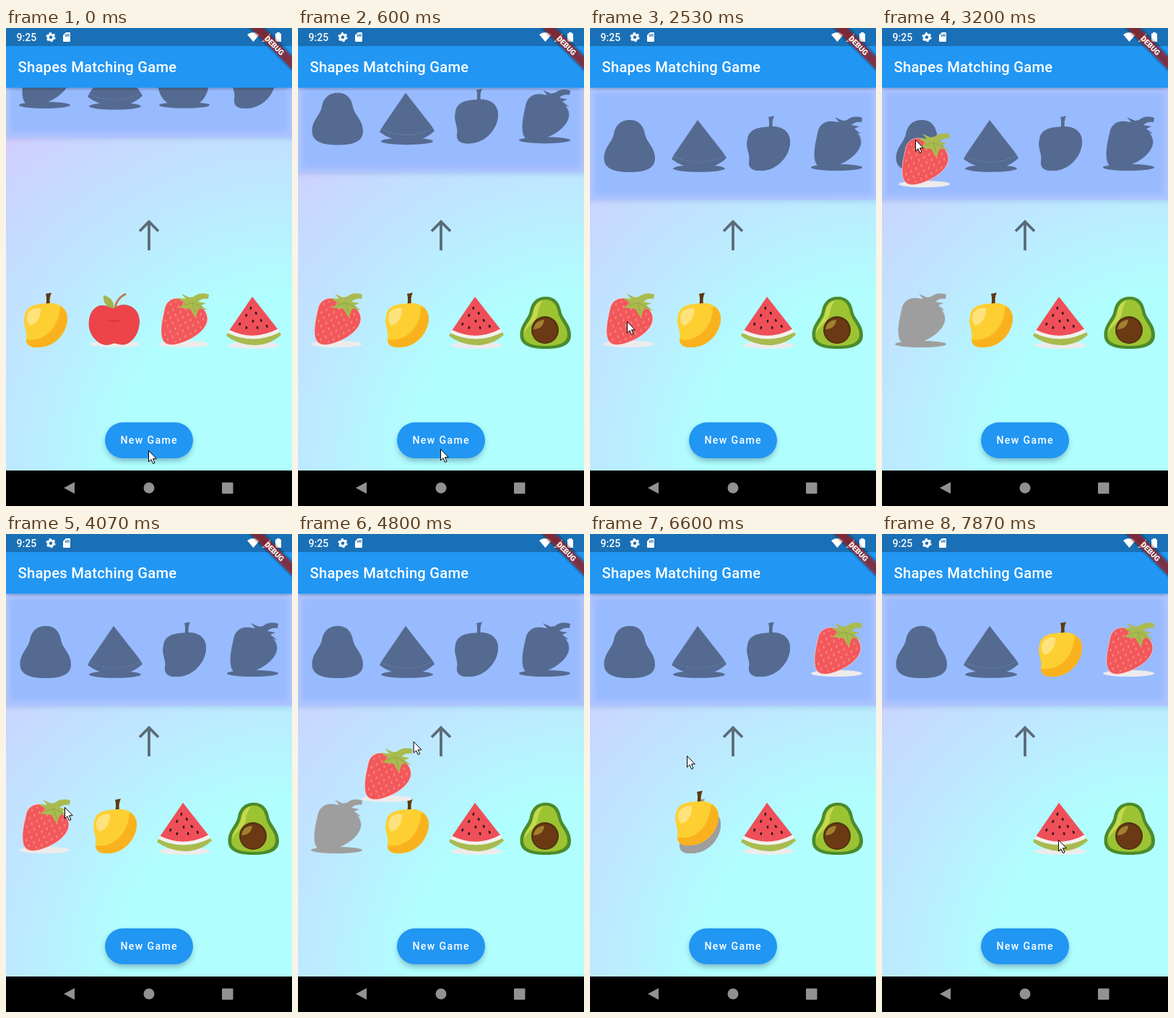
Animation, 396 px wide and 660 px high, one loop 8000 ms. Source, as an HTML page:

```html
<!DOCTYPE html>
<html lang="en">
<head>
<meta charset="utf-8">
<title>Shapes Matching Game</title>
<style>
  html, body { margin: 0; width: 100%; height: 100%; overflow: hidden; }
  svg { display: block; }
  text { font-family: Roboto, sans-serif; font-weight: 500; fill: #fff; }
  .dark { filter: url(#dark); }
  .grey { filter: url(#grey); }
</style>
</head>
<body>
<svg width="396" height="660" viewBox="0 0 396 660">
  <defs>
    <radialGradient id="sky" gradientUnits="userSpaceOnUse" cx="396" cy="610" r="660">
      <stop offset=".36" stop-color="#b0fffe"/>
      <stop offset=".5" stop-color="#b8f1ff"/>
      <stop offset=".63" stop-color="#bfe5ff"/>
      <stop offset=".78" stop-color="#c7d9ff"/>
      <stop offset="1" stop-color="#d8c6ff"/>
    </radialGradient>
    <filter id="dark"><feFlood flood-color="#546a90"/><feComposite in2="SourceAlpha" operator="in"/></filter>
    <filter id="grey"><feFlood flood-color="#9e9e9e"/><feComposite in2="SourceAlpha" operator="in"/></filter>
    <filter id="soft" x="-20%" y="-20%" width="140%" height="140%"><feGaussianBlur stdDeviation="4"/></filter>
    <clipPath id="body"><path d="M0 82H396V610H0Z"/></clipPath>
    <pattern id="seeds" width="11" height="12" patternUnits="userSpaceOnUse" patternTransform="rotate(18)">
      <path d="M2 2l.7 2.200M7.500 8l.7 2.200" stroke="#f9a99a" stroke-width="1.2" stroke-linecap="round"/>
    </pattern>
    <pattern id="dots" width="5" height="5" patternUnits="userSpaceOnUse" patternTransform="rotate(20)">
      <path fill="#ee4348" d="M0 0H5V5H0Z"/>
      <circle cx="1.5" cy="1.5" r=".45" fill="#d93a40"/><circle cx="4" cy="4" r=".45" fill="#f2666a"/>
    </pattern>

    <g id="mango">
      <path fill="#5f3813" d="M55.500 22C56.500 15 56 10 55 7L63 5.500C60.500 10 60 16 61 22Z"/>
      <path fill="#fdcf31" d="M26 37C28 25 39 20.500 56 20.500C72 18 85 26 85 41C85 60 68 82 42 81C32 81 27 76 28 68C30 60 25 52 25 44Z"/>
      <path fill="#f9b21d" d="M75 24C82 28 85 34 85 41C85 60 68 82 42 81C33 81 28 77 28 70C54 74 73 54 75 24Z"/>
      <path fill="#fee27c" d="M30 35C33 28 41 25 48 27C49 38 43 48 34 51C28 47 28 40 30 35Z"/>
    </g>
    <g id="apple">
      <ellipse cx="55" cy="76.500" rx="35" ry="4.300" fill="#eeebec"/>
      <path fill="url(#dots)" stroke="#d5363e" stroke-width=".7" d="M55 27C62 19 87 20 88.500 44C89 62 77 77 66 77C60 77 58 75 53 75C48 77 44 78 40 77C29 75 19 62 19 49C19 28 32 21 42 24C48 24 52 25 55 27Z"/>
      <path fill="none" stroke="#c9343b" d="M45 43Q55 47 63 42M51 45l8-1"/>
      <path fill="none" stroke="#bd7b4f" stroke-width="3" d="M55 27Q57 13 70 7"/>
      <path fill="#a5b448" d="M53 27C42 26 38 18 39 9C49 11 54 18 53 27Z"/>
    </g>
    <g id="strawberry">
      <ellipse cx="53.5" cy="76.500" rx="35.5" ry="4.500" fill="#eeebec"/>
      <path fill="#f2585b" stroke="#ffe3e0" stroke-width=".6" d="M23 62C22 50 26 36 28 26C31 15 42 11 52 14L66 18C78 22 88 32 87 43C85 58 66 70 50 75C38 79 24 80 23 62Z"/>
      <path fill="url(#seeds)" d="M26 62C25 50 29 36 31 27C34 17 44 14 52 17L66 22C77 25 85 33 84 43C82 55 66 67 50 72C38 76 27 76 26 62Z"/>
      <path fill="#a9bb4f" d="M51 7L62 12L68 11C72 7 80 5 89 8L88 14C81 13 77 15 74 18L85 20L78 23L87 30L75 27L70 40L63 28L47 26L56 20L45 13L57 14Z"/>
      <path fill="none" stroke="#8fa743" d="M54 23L66 19L70 33M66 19L80 26"/>
    </g>
    <g id="melon">
      <ellipse cx="55" cy="78" rx="36" ry="4.800" fill="#eeebec"/>
      <path fill="#a9bb4f" d="M19 61Q55 78 91 60L93 63.500Q78 78 55 78Q32 77 17 65Z"/>
      <path fill="#f3f1ee" d="M21.500 57L88 55.500L91 60Q55 78 19 61Z"/>
      <path fill="#ef4f58" d="M53 11L88 55.500Q55 73 21.500 57Z"/>
      <path stroke="#33191d" stroke-width="2.600" stroke-linecap="round" d="M51 26l-.3 1.500M45 36l-.5 1.500M58 33l.5 1.500M54 44l0 1.500M65 43l.5 1.500M36 48l-.5 1.500M45 53l-.3 1.500M60 53l.3 1.500M73 51l.5 1.500"/>
    </g>
    <g id="avocado">
      <path fill="#4b8b2c" d="M55 11C68 11 74 19 76 30C78 42 90 48 90 64C90 78 77 83 55 83C33 83 19.500 78 19.500 64C19.500 48 31 42 33 30C35 19 42 11 55 11Z"/>
      <path fill="#9cc332" d="M55 15C65 15 70 22 72 32C74 44 85 50 85 63C85 75 73 79 55 79C36 79 24 75 24 63C24 50 35 44 37 32C39 22 45 15 55 15Z"/>
      <path fill="#c6d94f" d="M51 16C43 18 39 24 38 32C36 45 25 50 25 62C28 52 42 46 44 34C45 26 48 21 51 16Z"/>
      <circle cx="54" cy="57" r="19" fill="#51300f"/>
      <circle cx="54" cy="57.500" r="17" fill="#6b3a15"/>
      <path fill="#a1802f" d="M38 56C39 48 45 43 53 43C52 51 47 56 38 56Z"/>
    </g>
  </defs>

  <path fill="url(#sky)" d="M0 82H396V611H0Z"/>
  <path fill="none" stroke="#5b6b78" stroke-width="3.800" d="M198 307V268M185 280.500L198 267.500L211 280.500"/>
  <g clip-path="url(#body)">
    <g id="panel">
      <rect x="-8" y="87" width="412" height="151" fill="#5f83c8" opacity=".35" filter="url(#soft)"/>
      <rect y="82" width="396" height="155" fill="#b0c5ff"/>
      <rect x="5" y="88" width="386" height="143" fill="#98baff" filter="url(#soft)"/>
      <g id="targets"></g>
    </g>
  </g>

  <rect x="139" y="550" width="118" height="47" rx="23" fill="#234a70" opacity=".45" filter="url(#soft)"/>
  <rect x="137" y="544.500" width="122" height="49.500" rx="24.700" fill="#2196f3"/>
  <text x="158.500" y="574" font-size="14.100" letter-spacing="1.35">New Game</text>

  <path d="M0 74H396V84H0Z" opacity=".25" filter="url(#soft)" clip-path="url(#body)"/>
  <path fill="#2196f3" d="M0 25H396V82.500H0Z"/>
  <path fill="#1a70b6" d="M0 0H396V25H0Z"/>
  <text x="16.500" y="61" font-size="20.200" letter-spacing=".24">Shapes Matching Game</text>
  <text x="14.500" y="18" font-size="14">9:25</text>
  <g fill="#fff">
    <circle cx="62" cy="12.700" r="3.700" fill="none" stroke="#fff" stroke-width="3"/>
    <circle cx="62" cy="12.700" r="5.600" fill="none" stroke="#fff" stroke-width="2" stroke-dasharray="3 2.864"/>
    <path d="M83 6H88Q89 6 89 7V18Q89 19 88 19H80Q79 19 79 18V10Z"/>
    <path fill="none" stroke="#1a70b6" stroke-width="1.200" d="M82.500 9v3M84.700 8v4M87 8v4"/>
    <path d="M334 9Q342.500 3 351 9L342.500 19Z"/>
    <path d="M354 19L366 7V19Z"/>
    <path d="M373 7.500H375V6H379V7.500H381V19H373Z"/>
  </g>
  <g transform="translate(396 0) rotate(45)">
    <path d="M-60 28H60V40H-60Z" opacity=".5" filter="url(#soft)"/>
    <path fill="#b71c1c" opacity=".63" d="M-60 28H60V40.500H-60Z"/>
    <text y="38" font-size="10.300" text-anchor="middle" style="font-weight:900">DEBUG</text>
  </g>

  <path d="M0 611H396V660H0Z"/>
  <g fill="#919191">
    <path d="M80 635L95 627V643Z"/>
    <circle cx="198" cy="635" r="7.500"/>
    <rect x="299" y="627.500" width="15.500" height="15.500" rx="1"/>
  </g>

  <g id="pieces"></g>
  <path id="cursor" fill="#fff" stroke="#000" d="M.5 .5V16L4 12.700L6.500 18.500L9 17.500L6.500 11.800H11.300Z"/>
</svg>

<script>
const TICKS = 120, TICKS_PER_MS = 0.015;   // 15 pictures a second, 8 s
const LAG = 1.5;                           // dragged pieces trail the pointer
const SLOT = 96, TOP = 116, BOTTOM = 360;
const el = id => document.getElementById(id);

// Rows before and after the reshuffle
const rounds = [
  { top: ['strawberry', 'melon', 'apple', 'mango'], bottom: ['mango', 'apple', 'strawberry', 'melon'] },
  { top: ['avocado', 'melon', 'mango', 'strawberry'], bottom: ['strawberry', 'mango', 'melon', 'avocado'] }
];
const RESHUFFLE = 6, PANEL_END = 16;

const drags = [
  { name: 'strawberry', from: 39, to: 55, grab: [51, 405] },
  { name: 'strawberry', from: 67, to: 86, grab: [47, 399], match: true },
  { name: 'mango', from: 97, to: 114, grab: [141, 400], match: true }
];

// Pointer path: tick, x, y
const path = [
  [0, 197, 583], [5, 197, 583], [8, 197, 581], [25, 197, 581],
  [37.5, 51, 405], [39, 51, 405], [46.5, 56, 184], [48, 46, 154], [50, 47, 145],
  [54, 47, 145], [58, 92, 290], [61, 81, 377], [65, 47, 399], [66, 47, 399],
  [77.5, 313, 161], [79, 338, 152], [81, 350, 145], [85, 350, 145],
  [95, 141, 400], [96, 141, 400], [97.5, 138, 389], [99, 134, 306], [102, 123, 230],
  [107.5, 235, 143], [113, 235, 143], [118, 244, 422], [120, 244, 422]
];

const slope = (i, axis) => path[i + 1]
  ? (path[i + 1][axis] - path[i][axis]) / (path[i + 1][0] - path[i][0]) : 0;

// Tangent that never overshoots a key
function tangent(i, axis) {
  const a = i ? slope(i - 1, axis) : 0, b = slope(i, axis);
  return a * b > 0 ? 2 * a * b / (a + b) : 0;
}

function pointer(tick) {
  const t = Math.max(0, tick);
  const i = Math.max(0, path.findIndex(key => key[0] > t) - 1);
  const span = path[i + 1][0] - path[i][0], u = (t - path[i][0]) / span;
  return [1, 2].map(axis => {
    const p = path[i][axis], q = path[i + 1][axis];
    return p + (q - p) * u * u * (3 - 2 * u)
      + span * u * (1 - u) * ((1 - u) * tangent(i, axis) - u * tangent(i + 1, axis));
  });
}

const piece = (name, x, y, look = '') =>
  `<use href="#${name}" x="${x}" y="${y}" class="${look}"/>`;

function render(tick) {
  const round = rounds[tick < RESHUFFLE ? 0 : 1];
  const drag = drags.find(d => tick >= d.from && tick < d.to);
  const matched = name => drags.some(d => d.match && d.name === name && tick >= d.to);

  el('panel').setAttribute('transform', `translate(0 ${Math.min(0, 86 * (tick / PANEL_END - 1))})`);
  el('targets').innerHTML = round.top.map((name, i) =>
    piece(name, i * SLOT, TOP, matched(name) ? '' : 'dark')).join('');

  let pieces = round.bottom.map((name, i) => matched(name) ? '' :
    piece(name, i * SLOT, BOTTOM, drag && drag.name === name ? 'grey' : '')).join('');
  if (drag) {
    const [x, y] = pointer(tick - LAG);
    const home = round.bottom.indexOf(drag.name) * SLOT;
    pieces += piece(drag.name, home + x - drag.grab[0], BOTTOM + y - drag.grab[1]);
  }
  el('pieces').innerHTML = pieces;
  el('cursor').setAttribute('transform', `translate(${pointer(tick)})`);
}

const start = performance.now();
let shown = -1;
function loop() {
  const tick = Math.floor((performance.now() - start + 4) * TICKS_PER_MS) % TICKS;
  if (tick !== shown) render(shown = tick);
  requestAnimationFrame(loop);
}
loop();
</script>
</body>
</html>
```
